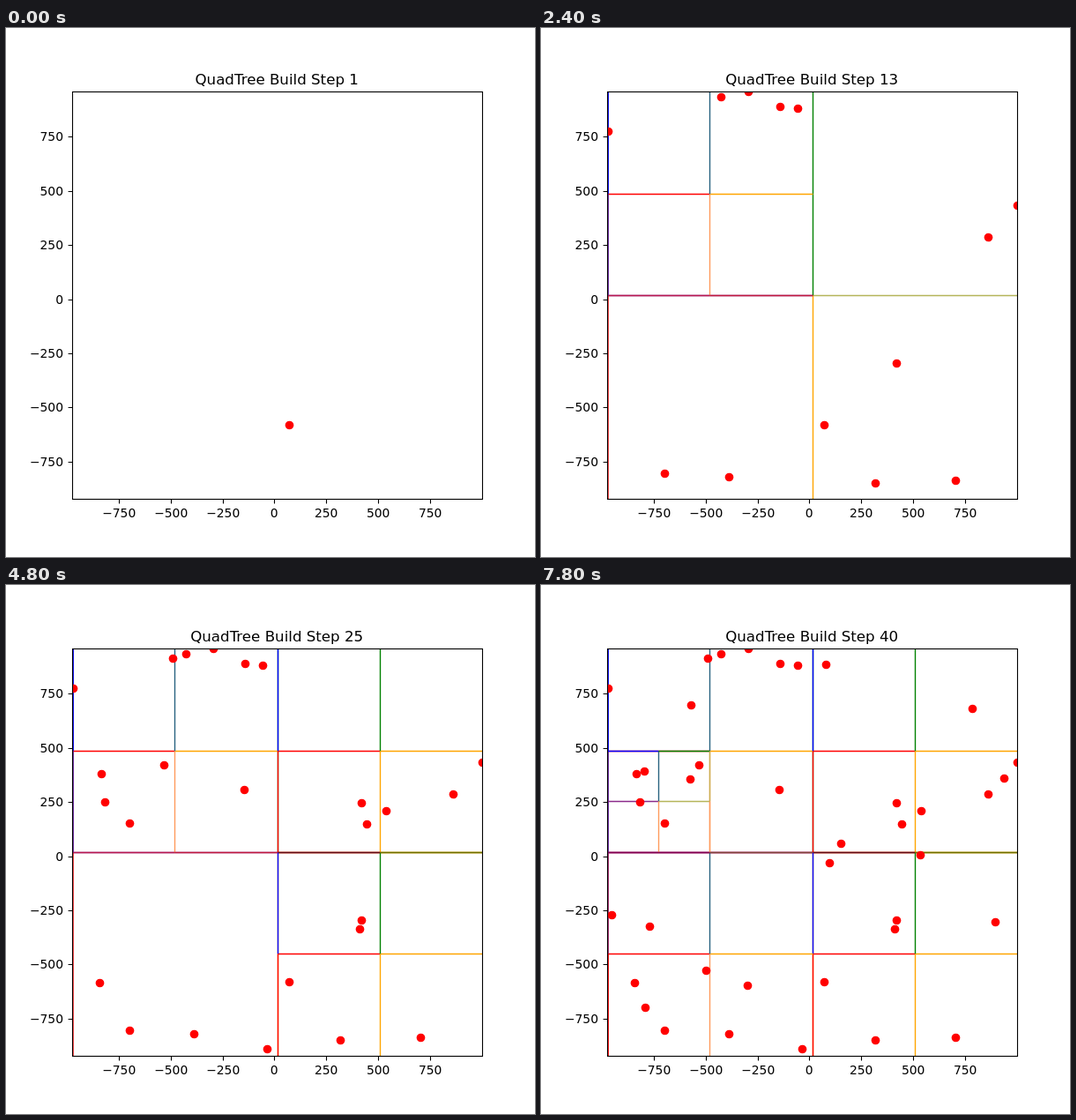
An HTML page that plays this animation: 600 px wide and 600 px high, repeating every 8000 ms.

```html
<!DOCTYPE html>
<html lang="en">
<head>
<meta charset="utf-8">
<style>
  html, body { margin: 0; width: 100%; height: 100%; overflow: hidden; background: #fff; }
  svg { display: block; width: 600px; height: 600px; }
  text { font-family: "DejaVu Sans", sans-serif; font-size: 13.89px; }
  #title { font-size: 16.67px; }
</style>
</head>
<body>
<svg viewBox="0 0 600 600">
  <clipPath id="plot"><rect x="75" y="72" width="465.5" height="462.5"/></clipPath>
  <g clip-path="url(#plot)">
    <g id="cells" stroke-width="1.39"></g>
    <g id="points" fill="red"></g>
  </g>
  <g id="axes" stroke-width="1.11"></g>
  <text id="title" x="307.2" y="64" text-anchor="middle"></text>
</svg>
<script>
const STEP_MS = 200, STEPS = 40;
const byId = id => document.getElementById(id);
const timed = [];

function add(parent, tag, attrs, step) {
  const node = document.createElementNS("http://www.w3.org/2000/svg", tag);
  for (const key in attrs) node.setAttribute(key, attrs[key]);
  byId(parent).append(node);
  if (step) timed.push({ node, step });
  return node;
}

// Cell coordinates are eighths of the plot, snapped to pixel centres.
const gridX = i => i ? Math.floor(75.5 + 58.125 * i) + 0.5 : 76;
const gridY = i => Math.floor(72.6 + 57.72 * i) + 0.5;

function line(step, x1, y1, x2, y2, stroke) {
  add("cells", "line", { x1: gridX(x1), y1: gridY(y1), x2: gridX(x2), y2: gridY(y2), stroke }, step);
}

// Draws the inner cross (top, left, right, bottom) and the recoloured halves of outer edges.
function split(step, x, y, size, cross, edges) {
  const half = size / 2, mx = x + half, my = y + half, ex = x + size, ey = y + size;
  const horizontal = (row, [a, b]) => {
    line(step, x, row, mx, row, a);
    line(step, mx, row, ex, row, b);
  };
  const vertical = (col, [a, b]) => {
    line(step, col, y, col, my, a);
    line(step, col, my, col, ey, b);
  };
  const [top, left, right, bottom] = cross;
  horizontal(my, [left, right]);
  vertical(mx, [top, bottom]);
  if (edges.top) horizontal(y, edges.top);
  if (edges.bottom) horizontal(ey, edges.bottom);
  if (edges.left) vertical(x, edges.left);
  if (edges.right) vertical(ex, edges.right);
}

const teal = "#28627f", salmon = "#ff9a5c", olive = "#b5b55a", purple = "#8a2a8a";
split(5, 0, 0, 8, ["green", purple, olive, "orange"], { left: ["blue", "red"] });
split(12, 0, 0, 4, [teal, "red", "orange", salmon],
  { left: ["blue", purple], bottom: ["#b8184f", "#c0183c"] });
split(22, 4, 0, 4, ["green", "red", "orange", "orange"],
  { left: ["blue", "red"], bottom: ["red", "orange"] });
split(24, 4, 4, 4, ["green", "red", "orange", "orange"],
  { left: ["blue", "red"], top: ["#600c18", "#6b7000"] });
split(27, 0, 2, 2, [teal, purple, olive, salmon],
  { top: ["blue", "green"], right: ["#c8b050", salmon] });
split(29, 0, 4, 4, [teal, "red", "orange", salmon],
  { left: [purple, "red"], top: ["#800050", "#80453c"] });

const points = [
  [321, 450], [403, 380], [204, 78], [470, 513], [213, 509], [379, 516], [540, 201], [271, 89],
  [507, 237], [76, 117], [291, 91], [235, 72], [140, 505], [108, 214], [403, 247], [296, 526],
  [270, 232], [431, 256], [112, 246], [189, 83], [179, 204], [409, 271], [140, 270], [401, 390],
  [106, 451], [525, 219], [117, 211], [340, 293], [187, 437], [489, 140], [169, 220], [515, 382],
  [118, 479], [327, 315], [123, 387], [323, 90], [80, 374], [170, 136], [430, 306], [234, 454]
];
points.forEach(([x, y], i) => add("points", "circle", { cx: x + 0.5, cy: y + 0.5, r: 4.86 }, i + 1));

add("axes", "rect", { x: 75.5, y: 72.5, width: 465, height: 462, fill: "none", stroke: "black" });
for (let value = -750; value <= 750; value += 250) {
  const x = Math.floor(304.9 + 0.235 * value) + 0.5;
  const y = Math.floor(308 - 0.2457 * value) + 0.5;
  const label = String(value).replace("-", "\u2212");
  add("axes", "path", { d: `M${x} 534.5v4.9M75.5 ${y}h-4.9`, stroke: "black" });
  add("axes", "text", { x: x - 0.3, y: 555, "text-anchor": "middle" }).textContent = label;
  add("axes", "text", { x: 65, y: y + 4.8, "text-anchor": "end" }).textContent = label;
}

function draw(now) {
  const step = Math.floor(now / STEP_MS) % STEPS + 1;
  for (const item of timed) item.node.style.display = item.step <= step ? "" : "none";
  byId("title").textContent = `QuadTree Build Step ${step}`;
  requestAnimationFrame(() => draw(performance.now() - start));
}
const start = performance.now();
draw(0);
</script>
</body>
</html>
```
